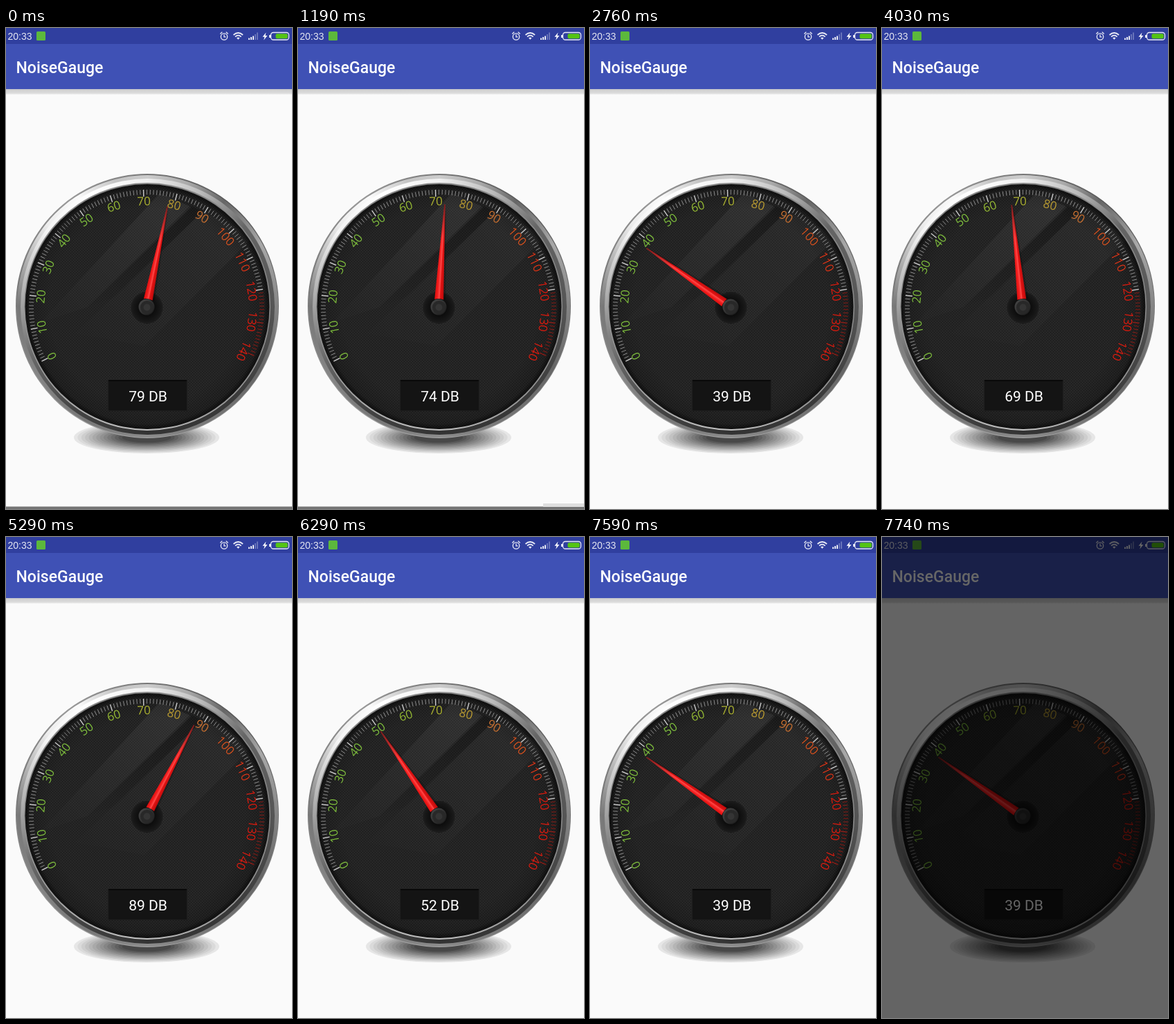
Write an HTML page that moves like this. It is 413 px wide and 693 px high and loops after 8860 ms.

```html
<!DOCTYPE html>
<html lang="en">
<head>
<meta charset="utf-8">
<title>Noise gauge</title>
<style>
  html, body { margin: 0; width: 100%; height: 100%; overflow: hidden; background: #fafafa; }
  #stage { position: relative; width: 413px; height: 693px; overflow: hidden; background: #fafafa; }
  svg { position: absolute; left: 0; top: 0; }
  .ring { position: absolute; border-radius: 50%; }
  #rim { left: 14px; top: 210px; width: 380px; height: 381px;
    background: conic-gradient(#777, #555 12%, #777 25%, #999 40%, #a5a5a5 50%, #909090 65%, #777 78%, #999 90%, #777); }
  #bezel { left: 15.5px; top: 211.5px; width: 377px; height: 378px;
    background: conic-gradient(#ccc, #aaa 5%, #666 10%, #a8a8a8 17%, #858585 25%, #666 33%, #777 42%, #8c8c8c 50%,
      #777 58%, #858585 66%, #777 75%, #aaa 80%, #eee 86%, #fafafa 91%, #c4c4c4 96%, #ccc); }
  #groove { left: 21px; top: 217px; width: 367px; height: 369px;
    background: conic-gradient(#f0f0f0, #bbb 7%, #666 14%, #555 25%, #3a3a3a 38%, #333 50%, #444 60%, #666 68%, #aaa 76%, #f4f4f4 85%, #fff 93%, #f0f0f0); }
  #lip { left: 26px; top: 223px; width: 356px; height: 357px;
    background: conic-gradient(#888, #888 20%, #999 40%, #c4c4c4 50%, #a0a0a0 65%, #888 80%, #888); }
  .roboto { font-family: Roboto, sans-serif; }
  #scale text { font: 17px "Open Sans", sans-serif; text-anchor: middle; }
</style>
</head>
<body>
<div id="stage">
  <svg width="413" height="693">
    <defs>
      <linearGradient id="drop" x2="0" y2="1">
        <stop stop-color="#c4c5ca"/><stop offset=".25" stop-color="#d2d2d2"/>
        <stop offset=".75" stop-color="#dcdcdc"/><stop offset="1" stop-color="#f6f6f6"/>
      </linearGradient>
    </defs>
    <rect y="88" width="413" height="8" fill="url(#drop)"/>
    <rect width="413" height="23" fill="#303f9f"/>
    <rect y="23" width="413" height="65" fill="#3f51b5"/>
    <text class="roboto" x="14.5" y="65" font-size="23" font-weight="500" fill="#fff">NoiseGauge</text>
    <text x="2.5" y="17" font-family="Liberation Sans, sans-serif" font-size="14" fill="#e4e6f2">20:33</text>
    <rect x="44" y="5" width="13" height="13" rx="1.5" fill="#5cb83c"/>
    <g fill="none" stroke="#e8eaf5" stroke-width="1.3">
      <circle cx="315" cy="12.5" r="4.7"/>
      <path d="M315 9.5v3.3h2.5M309.3 8.5l3-2.8M320.7 8.5l-3-2.8"/>
      <path d="M328.5 10q6.8-6 13.6 0M331 12.6q4.3-4 8.6 0" stroke-width="1.7"/>
      <path d="M333 14.3q2.3-1.8 4.6 0l-2.3 2.5z" fill="#e8eaf5" stroke="none"/>
      <path d="M351 17v-2.5M354 17v-4M357 17v-5.5" stroke-width="2"/>
      <path d="M360 17v-8M363 17v-10.5" stroke-width="2" opacity=".3"/>
      <path d="M375.5 6.5l-5 6.3h3l-1.3 4.7 5.2-6.5h-3z" fill="#fff" stroke="none"/>
      <rect x="382.5" y="6.5" width="26" height="10.5" rx="3.5"/>
      <path d="M381 10v4" stroke-width="2"/>
      <rect x="389.5" y="8.3" width="17.3" height="7" rx="2" fill="#54c414" stroke="none"/>
    </g>
    <g id="ground"></g>
    <rect id="strip" y="689.5" width="413" height="4" fill="#747474"/>
    <rect id="patch" x="354" y="685" width="59" height="5" fill="#dedede"/>
  </svg>

  <div class="ring" id="rim"></div>
  <div class="ring" id="bezel"></div>
  <div class="ring" id="groove"></div>
  <div class="ring" id="lip"></div>

  <svg width="413" height="693">
    <defs>
      <pattern id="mesh" width="4" height="4" patternUnits="userSpaceOnUse">
        <rect width="4" height="4" fill="#2a2a2a"/>
        <path d="M0 .5h3M2 2.5h2M0 2.5h1" stroke="#191919"/>
      </pattern>
      <radialGradient id="shade">
        <stop offset=".8" stop-opacity="0"/><stop offset=".96" stop-opacity=".15"/>
        <stop offset="1" stop-opacity=".6"/>
      </radialGradient>
      <linearGradient id="glare" gradientUnits="userSpaceOnUse" x1="265" y1="240" x2="85" y2="420">
        <stop stop-color="#fff" stop-opacity=".07"/><stop offset="1" stop-color="#fff" stop-opacity=".01"/>
      </linearGradient>
      <linearGradient id="streak" gradientUnits="userSpaceOnUse" x1="275" y1="260" x2="130" y2="400">
        <stop stop-opacity=".22"/><stop offset="1" stop-opacity=".02"/>
      </linearGradient>
      <linearGradient id="red" gradientUnits="userSpaceOnUse" x1="-7" x2="7">
        <stop stop-color="#d80c0c"/><stop offset=".3" stop-color="#f01c1c"/>
        <stop offset=".52" stop-color="#ff4848"/><stop offset=".6" stop-color="#e01414"/>
        <stop offset="1" stop-color="#b80808"/>
      </linearGradient>
      <linearGradient id="tip" x2="0" y2="1">
        <stop stop-color="#200" stop-opacity=".6"/><stop offset=".35" stop-color="#200" stop-opacity="0"/>
      </linearGradient>
      <radialGradient id="hub">
        <stop offset=".5" stop-color="#0d0d0d"/><stop offset=".85" stop-color="#171717"/>
        <stop offset="1" stop-color="#1d1d1d"/>
      </radialGradient>
      <linearGradient id="cap" x2="1" y2="1">
        <stop stop-color="#4a4a4a"/><stop offset="1" stop-color="#191919"/>
      </linearGradient>
      <clipPath id="face"><circle cx="204" cy="401.5" r="175.5"/></clipPath>
    </defs>
    <circle cx="204" cy="401.5" r="176.5" fill="#151515"/>
    <g clip-path="url(#face)">
      <circle cx="204" cy="401.5" r="176" fill="url(#mesh)"/>
      <path d="M222 238L268 258 118 402 50 424Z" fill="url(#glare)"/>
      <path d="M266 256L284 264 158 388 116 402Z" fill="url(#streak)"/>
      <path d="M284 264L358 300 200 458 100 440Z" fill="url(#glare)" opacity=".5"/>
      <circle cx="204" cy="401.5" r="176" fill="url(#shade)"/>
    </g>
    <g id="scale"></g>
    <rect x="147.5" y="506.5" width="114" height="45" fill="#141414" stroke="#202020"/>
    <path d="M148 508h113" stroke="#0a0a0a" stroke-width="2"/>
    <text id="reading" class="roboto" x="205" y="538" font-size="21" fill="#fff" text-anchor="middle"></text>
    <circle cx="203.5" cy="403" r="23" fill="url(#hub)"/>
    <g id="needle">
      <path d="M-6.8 -11L2 -143 9.5 -11Z" fill="#000" opacity=".22"/>
      <path id="blade" d="M-6.5 -11L-.6 -148H.6L6.5 -11Q0 -13 -6.5 -11Z" fill="url(#red)"/>
      <use href="#blade" style="display:none"/>
      <path d="M-6.5 -11L-.6 -148H.6L6.5 -11Q0 -13 -6.5 -11Z" fill="url(#tip)"/>
    </g>
    <circle cx="203" cy="402" r="11.5" fill="url(#cap)"/>
    <circle cx="203.5" cy="402.5" r="9.5" fill="#282828"/>
    <circle cx="203.5" cy="402.5" r="5" fill="#343434"/>
    <rect id="dim" width="413" height="693" fill="#000" opacity=".6"/>
  </svg>
</div>
<script>
const $ = id => document.getElementById(id);
const LOOP = 8860, STEP = 131, DIM_AT = 7740;
const CX = 203, CY = 402;

// Level in dB at each key step
const levels = [[0, 79.4], [9, 74.4], [21, 39], [30, 68.6], [40, 89], [56, 39], [99, 39]];

const labelColor = db => db <= 50 ? '#7cba3c'
  : ({ 60: '#94b834', 70: '#aab030', 80: '#b89a30', 90: '#c87030', 100: '#d2501f', 110: '#d43418' })[db] || '#d81c10';

function drawGround() {
  const layers = 14;
  let out = '';
  for (let i = 0; i < layers; i++) {
    const p = i / layers, tone = Math.round(230 - 170 * p);
    out += `<ellipse cx="203" cy="590" rx="${105 - 75 * p}" ry="${23 - 17 * p}" fill="rgb(${tone},${tone},${tone})"/>`;
  }
  $('ground').innerHTML = out;
}

function drawScale() {
  let out = '';
  for (let db = 0; db <= 140; db++) {
    const turn = -117 + db * 1.65;
    const major = db % 10 === 0;
    const inner = major ? 160 : 163;
    const color = db > 120 ? '#8e1c16' : major ? '#ccc' : '#909090';
    out += `<g transform="translate(${CX} ${CY + 1}) rotate(${turn})">
      <path d="M0 ${-inner}V-170" stroke="${color}" stroke-width="${major ? 1.4 : 0.9}"/>`;
    if (major) out += `<text y="-147.5" fill="${labelColor(db)}">${db}</text>`;
    out += '</g>';
  }
  $('scale').innerHTML = out;
}

function levelAt(step) {
  const next = levels.findIndex(key => key[0] > step);
  const [from, a] = levels[next - 1], [to, b] = levels[next];
  const p = (step - from) / (to - from);
  return a + (b - a) * (1 - (1 - p) ** 2);
}

function render(time) {
  const step = Math.floor(time / STEP);
  const level = levelAt(step);
  $('needle').setAttribute('transform', `translate(${CX} ${CY}) rotate(${(level - 72.3) * 1.655})`);
  $('reading').textContent = Math.round(level) + ' DB';
  $('strip').style.display = step < 10 ? '' : 'none';
  $('patch').style.display = step === 8 || step === 9 ? '' : 'none';
  $('dim').style.display = time >= DIM_AT ? '' : 'none';
}

function tick() {
  render(performance.now() % LOOP);
  requestAnimationFrame(tick);
}

drawGround();
drawScale();
tick();
</script>
</body>
</html>
```
